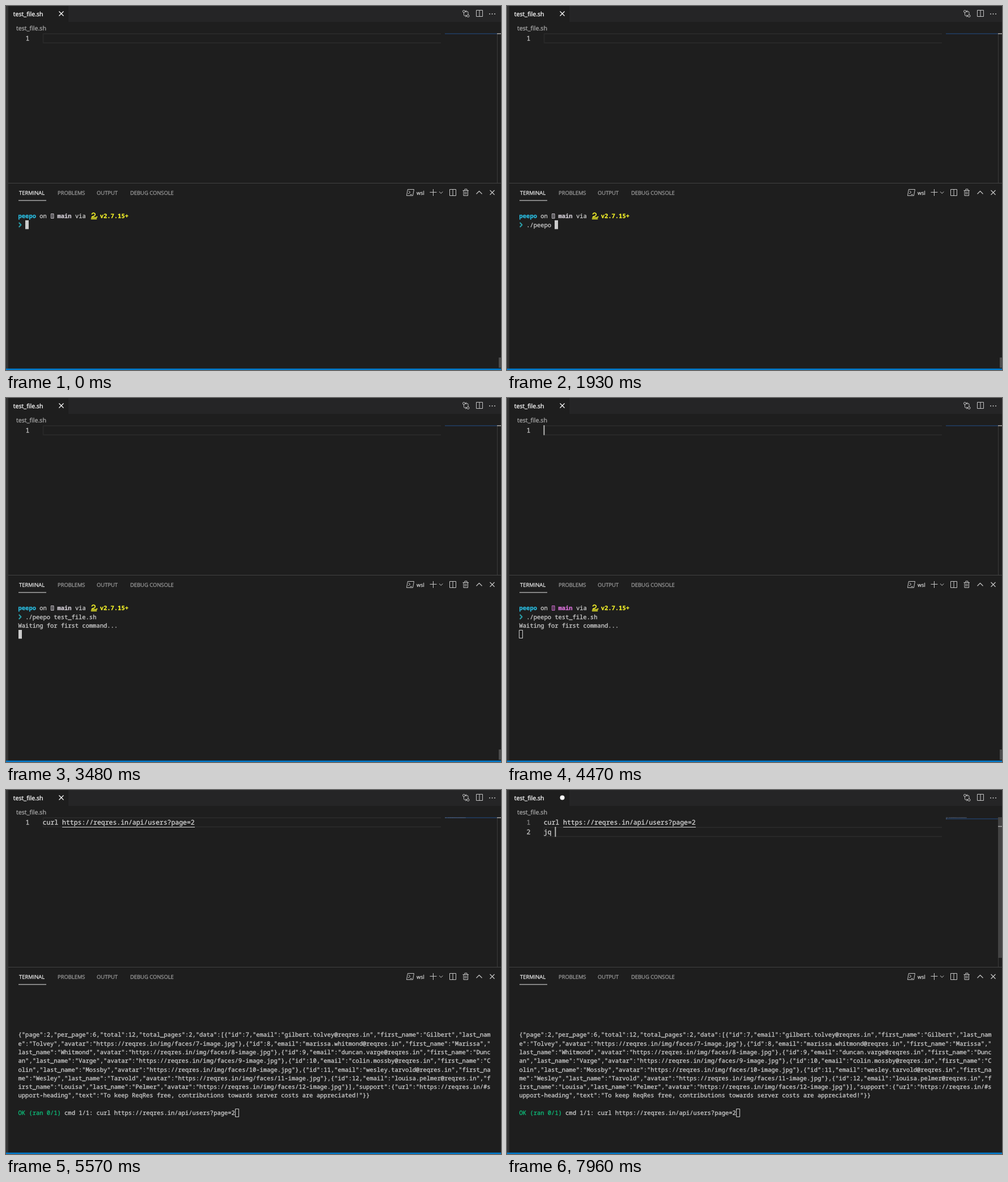
An HTML page with a canvas that plays this animation: 873x642 px, repeating every 8000 ms.

```html
<!DOCTYPE html>
<html lang="en">
<head>
<meta charset="utf-8">
<title>Editor with live terminal</title>
<style>
html, body { margin: 0; width: 100%; height: 100%; overflow: hidden; background: #1e1e1e; }
canvas { display: block; }
</style>
</head>
<body>
<canvas id="stage" width="873" height="642"></canvas>
<script>
const ctx = document.getElementById('stage').getContext('2d');
const LOOP = 8000;
const MONO = '"Noto Sans Mono", "DejaVu Sans Mono", monospace';
const SANS = '"Open Sans", "Noto Sans", sans-serif';
const FG = '#cccccc', ICON = '#c5c5c5', YELLOW = '#f0ee28';

// Terminal and editor character grids
const TERM = { x: 21.6, y: 363, w: 6.27, h: 15.27, size: 10.45, base: 11.4 };
const EDIT = { x: 64.7, y: 48, w: 6.88, h: 17.2, size: 11.467, base: 13 };

const URL_TEXT = 'https://reqres.in/api/users?page=2';
const COMMAND = './peepo test_file.sh ';
const KEYS = [330, 670, 930, 1020, 1110, 1200, 1400, 1930, 2030, 2130, 2230, 2330, 2530];
const COMPLETE = 2690, ENTER = 3080, WAITING = 3480, FOCUS = 4470, PASTE = 4680,
  BLINK_OFF = 5100, SAVE = 5370, OUTPUT = 5570, BLINK_ON = 6430, NEWLINE = 6900,
  SLIDER = 6960, BLINK_OFF2 = 7430, JQ = [7830, 7895, 7960];

const people = ['Gilbert Tolvey', 'Marissa Whitmond', 'Duncan Varge',
  'Colin Mossby', 'Wesley Tarvold', 'Louisa Pelmer'];

function response() {
  const data = people.map((name, i) => {
    const [first, last] = name.split(' ');
    const id = i + 7;
    return {
      id,
      email: `${first}.${last}@reqres.in`.toLowerCase(),
      first_name: first,
      last_name: last,
      avatar: `https://reqres.in/img/faces/${id}-image.jpg`
    };
  });
  return JSON.stringify({
    page: 2, per_page: 6, total: 12, total_pages: 2, data,
    support: {
      url: 'https://reqres.in/#support-heading',
      text: 'To keep ReqRes free, contributions towards server costs are appreciated!'
    }
  });
}
const outputLines = response().match(/.{1,133}/g);

function rect(x, y, w, h, color) {
  ctx.fillStyle = color;
  ctx.fillRect(x, y, w, h);
}

function stroke(d, color = ICON, width = 1) {
  ctx.strokeStyle = color;
  ctx.lineWidth = width;
  ctx.stroke(new Path2D(d));
}

function disc(x, y, r, color) {
  ctx.fillStyle = color;
  ctx.beginPath();
  ctx.arc(x, y, r, 0, 7);
  ctx.fill();
}

// The hairline outline gives small text a sturdier stem
function write(text, x, y, font, color) {
  ctx.font = font;
  ctx.fillStyle = ctx.strokeStyle = color;
  ctx.lineWidth = 0.3;
  ctx.fillText(text, x, y);
  ctx.strokeText(text, x, y);
}

const label = (text, x, y, size, color) => write(text, x, y, `${size}px ${SANS}`, color);

function mono(grid, text, col, row, color, weight = '') {
  const y = Math.round(grid.y + row * grid.h + grid.base);
  write(text, grid.x + col * grid.w, y, `${weight} ${grid.size}px ${MONO}`, color);
}
const term = (...args) => mono(TERM, ...args);
const edit = (...args) => mono(EDIT, ...args);

const cross = (x, y, r, color) =>
  stroke(`M${x - r} ${y - r}l${2 * r} ${2 * r}m0 ${-2 * r}l${-2 * r} ${2 * r}`, color, 1.2);

const splitIcon = (x, y) => stroke(`M${x} ${y}h11v11h-11zm5.5 0v11`);

function drawFrame() {
  rect(0, 0, 873, 642, '#1e1e1e');
  rect(110, 0, 763, 28, '#252526');
  rect(0, 0, 4, 640, '#333333');
  rect(4, 312, 869, 1, '#424242');
  rect(0, 639.5, 873, 2.5, '#007acc');
  label('test_file.sh', 12.7, 18, 10.7, '#ffffff');
  label('test_file.sh', 18, 43, 10.7, '#a9a9a9');

  // Editor actions
  stroke('M809.5 9.5a2 2 0 1 1-4 0a2 2 0 1 1 4 0M807.5 11.5v4q0 2 2 2h3m-2-2l2 2l-2 2' +
    'M817 17.5a2 2 0 1 1-4 0a2 2 0 1 1 4 0M815 15.5v-4q0-2-2-2h-3m2-2l-2 2l2 2');
  splitIcon(829.5, 7.5);
  for (const x of [853, 857.5, 862]) disc(x, 14, 1, ICON);

  // Panel header
  label('TERMINAL', 23, 333, 9.4, '#e7e7e7');
  label('PROBLEMS', 91, 333, 9.4, '#989898');
  label('OUTPUT', 160, 333, 9.4, '#989898');
  label('DEBUG CONSOLE', 219, 333, 9.4, '#989898');
  rect(22, 342.5, 49, 1, '#e7e7e7');
  stroke('M708.5 323.5h11l-2 11h-11zM710 326l3 2.5l-4 3M712.5 332.5h3.5');
  label('wsl', 724, 333, 9.2, FG);
  stroke('M753.5 323v12m-6-6.5h12M764 327.5l3.2 3l3.2-3');
  splitIcon(782.5, 323.5);
  stroke('M805.5 325.5h10.5M809 325v-2h4v2M807 326v8.5h7.5v-8.5M809.5 327.5v5m2.5-5v5');
  stroke('M829.5 331.5l5-5l5 5', ICON, 1.2);
  cross(857.5, 329, 4, ICON);
}

function drawPrompt(t) {
  const branch = t < FOCUS ? '#cdc8d0' : '#d670d6';
  term('peepo', 0, 0, '#29b8db', 'bold');
  term('on', 6, 0, FG);
  stroke('M79.5 366.5h4.5v8h-4.5zM81 368.5h2m-2 2h1.5m-1.5 2h2', branch);
  term('main', 11, 0, branch, 'bold');
  term('via', 16, 0, FG);
  // Snake
  ctx.lineCap = 'round';
  stroke('M151.5 367q1-2.5 4-1.7q3 1.6 1 4.2q-1.5 1.5-4.5 2M151 373h7.5q2 0 2-1.5M150.5 375.3h9', YELLOW, 1.7);
  ctx.lineCap = 'butt';
  term('v2.7.15+', 23, 0, YELLOW, 'bold');
  stroke('M22.7 382l3.8 4l-3.8 4', '#2b9fa9', 2);
}

function hollowCursor(col, row) {
  const x = Math.floor(TERM.x + col * TERM.w) + 0.5;
  const y = Math.round(TERM.y + row * TERM.h) + 0.5;
  stroke(`M${x} ${y}h6v14h-6z`, '#d0d0d0');
}

function blockCursor(col, row) {
  rect(Math.round(TERM.x + col * TERM.w), Math.round(TERM.y + row * TERM.h), 6, 15.5, FG);
}

function drawTerminal(t) {
  if (t >= OUTPUT) {
    outputLines.forEach((line, i) => term(line, 0, 4 + i, FG));
    term('OK (ran 0/1)', 0, 13, '#0dbc79');
    term('cmd 1/1: curl ' + URL_TEXT, 13, 13, FG);
    hollowCursor(61, 13);
    return;
  }
  drawPrompt(t);
  const typed = t >= COMPLETE ? COMMAND.length : KEYS.filter(k => t >= k).length;
  term(COMMAND.slice(0, typed), 2, 1, FG);
  if (t >= WAITING) term('Waiting for first command...', 0, 2, FG);

  if (t < ENTER) blockCursor(2 + typed, 1);
  else if (t < WAITING) blockCursor(0, 2);
  else if (t < FOCUS) blockCursor(0, 3);
  else hollowCursor(0, 3);
  if (t < BLINK_OFF) rect(869, 620, 4, 18, '#4b4b4b');
}

function drawMinimap(t, row) {
  rect(774, 48 + row * 2, 92, 1.7, '#213a5c');
  if (t < PASTE) return;
  for (let i = 0; i < 39; i++) {
    if (i !== 4) rect(774 + i * 0.94, 48, 0.7, 1.4, i % 3 ? '#59677f' : '#46536a');
  }
  JQ.slice(0, 2).forEach((k, i) => {
    if (t >= k) rect(774 + i, 50, 0.7, 1.4, '#59677f');
  });
}

function drawEditor(t) {
  const row = t >= NEWLINE ? 1 : 0;
  const top = Math.round(EDIT.y + row * EDIT.h);
  const keys = JQ.filter(k => t >= k).length;
  const col = row ? keys : t >= PASTE ? 39 : 0;

  stroke(`M767 ${top + 1}H65.5v16H767`, '#282828', 1.8);
  edit('1', -4.38, 0, row ? '#858585' : '#c6c6c6');
  if (row) edit('2', -4.38, 1, '#c6c6c6');
  if (t >= PASTE) edit('curl ' + URL_TEXT, 0, 0, '#d4d4d4');
  if (t >= OUTPUT) rect(EDIT.x + 5 * EDIT.w, 65, 34 * EDIT.w, 1, '#d4d4d4');
  edit('jq '.slice(0, keys), 0, 1, '#d4d4d4');

  const dirty = (t >= PASTE && t < SAVE) || t >= NEWLINE;
  if (dirty) disc(97.5, 13.5, 4, '#ffffff');
  else cross(97.5, 13.5, 4, '#ffffff');

  const caret = (t >= FOCUS && t < BLINK_OFF) || (t >= BLINK_ON && t < BLINK_OFF2) || t >= JQ[0];
  if (caret) rect(Math.round(EDIT.x + col * EDIT.w) - 0.5, top, 1.8, 17.5, '#c0c1bf');

  drawMinimap(t, row);
  rect(866, 48, 1, 264, '#3a3a3a');
  if (t >= SLIDER) rect(866, 48, 7, 248, '#434343');
  rect(866, row ? 63.5 : 48, 7, 1.6, '#a0a0a0');
}

function draw(t) {
  ctx.textRendering = 'geometricPrecision';
  ctx.lineJoin = 'round';
  drawFrame();
  drawEditor(t);
  drawTerminal(t);
}

const start = performance.now();
function tick(now) {
  draw(Math.max(0, now - start) % LOOP);
  requestAnimationFrame(tick);
}
draw(0);
requestAnimationFrame(tick);
</script>
</body>
</html>
```
